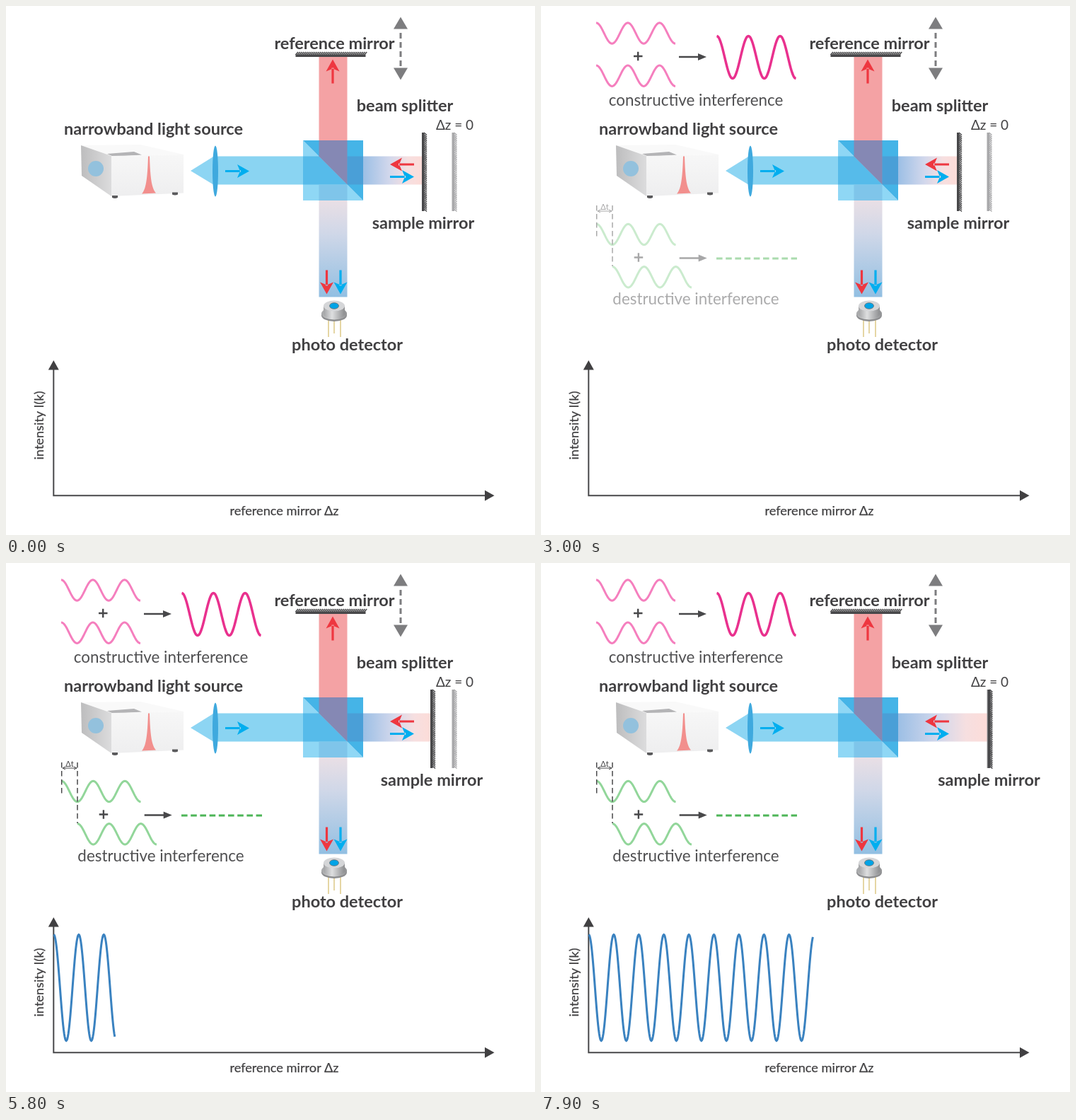
These frames come from a looping animation (748 px wide and 748 px high, 8 s). An HTML page:

```html
<!DOCTYPE html>
<html lang="en">
<head>
<meta charset="utf-8">
<title>Interferometer</title>
<style>
html, body { margin: 0; width: 100%; height: 100%; overflow: hidden; background: #fff; }
svg { display: block; width: 100%; height: 100%; }
text { font-family: Lato, "Open Sans", sans-serif; fill: #414042; }
.label { font-size: 23.5px; font-weight: 700; text-anchor: middle; }
.caption { font-size: 22.4px; fill: #505052; text-anchor: middle; }
.axis { font-size: 18.2px; stroke: #414042; stroke-width: .25; text-anchor: middle; }
.wave { fill: none; stroke-width: 3; }
.ink { stroke: #48484a; fill: none; }
</style>
</head>
<body>
<svg id="stage" viewBox="0 0 748 748">
  <defs>
    <linearGradient id="sampleBeam">
      <stop offset="0" stop-color="#9cbfe5"/>
      <stop offset=".45" stop-color="#d3d8ec"/>
      <stop offset=".75" stop-color="#f6dfe0"/>
      <stop offset="1" stop-color="#fddcd8"/>
    </linearGradient>
    <linearGradient id="detectorBeam" x2="0" y2="1">
      <stop offset="0" stop-color="#e9dfe5"/>
      <stop offset=".35" stop-color="#cfd7e8"/>
      <stop offset="1" stop-color="#92bfe2"/>
    </linearGradient>
    <linearGradient id="side">
      <stop offset="0" stop-color="#bdbdbe"/>
      <stop offset="1" stop-color="#dcdcdd"/>
    </linearGradient>
    <linearGradient id="front" x2="0" y2="1">
      <stop offset="0" stop-color="#f7f7f7"/>
      <stop offset="1" stop-color="#eeeeef"/>
    </linearGradient>
    <linearGradient id="metal">
      <stop offset="0" stop-color="#a2a3a5"/>
      <stop offset=".4" stop-color="#dedfe0"/>
      <stop offset="1" stop-color="#8d8e90"/>
    </linearGradient>
    <path id="arrow" d="M-34-1.6H-12V1.6H-34ZM0 0L-17-9.5L-13 0L-17 9.5Z"/>
    <g id="sumArrow">
      <path class="ink" stroke-width="2.4" d="M131 71h12.5M137.2 64.8v12.5M195 72h30"/>
      <path d="M234 72l-12-5v10z" fill="#48484a"/>
    </g>
  </defs>

  <!-- light source -->
  <path d="M106 197L190 196L251 210L149 212Z" fill="#f9f9f9"/>
  <path d="M143 209L181 206L192 210.5L152 213Z" fill="#b4b4b6"/>
  <path d="M106 197L149 212V269L107 240Z" fill="url(#side)"/>
  <path d="M149 212L251 210V264.500L149 269Z" fill="url(#front)"/>
  <path d="M150 268h8v3q-4 2-8 0zM235 263.500h8v3q-4 2-8 0z" fill="#5a5a5c"/>
  <circle cx="127" cy="230" r="11" fill="#93c1dd"/>
  <path d="M192 265.500C198 259 200 244 201 212.500H203C204 244 206 258 212 264.500Z" fill="#f28f8d"/>

  <!-- beams and splitter -->
  <path d="M261 233L294 212.500V253Z" fill="#8dd5f3"/>
  <path d="M296 212.500H420V252.500H296Z" fill="#8ad4f2"/>
  <ellipse cx="296" cy="233.500" rx="4" ry="36" fill="#3fa9de"/>
  <path d="M442.500 71H482.500V190H442.500Z" fill="#f4a2a4"/>
  <path d="M442.500 275H482.500V411.500H442.500Z" fill="url(#detectorBeam)"/>
  <rect id="sampleArm" x="505" y="212.500" height="40" fill="url(#sampleBeam)"/>
  <path d="M420 190V275H505Z" fill="#8fd7f5"/>
  <path d="M420 190H505V275Z" fill="#45b4e7"/>
  <path d="M420 212.500H442.500L482.500 252.500H420Z" fill="#56bbea"/>
  <path d="M482.500 252.500V275H442.500V252.500Z" fill="#7fc5ea"/>
  <path d="M482.500 212.500H505V252.500H482.500Z" fill="#4a9fd7"/>
  <path d="M442.500 190H482.500V252.500L442.500 212.500Z" fill="#8588b4"/>

  <!-- detector -->
  <path d="M456 444v24M464 444v19M473 444v24" stroke="#e3d29b" stroke-width="1.800"/>
  <ellipse cx="464" cy="437.500" rx="18" ry="8.500" fill="#8d8e90"/>
  <ellipse cx="464" cy="435" rx="18" ry="8.500" fill="url(#metal)"/>
  <path d="M449 424V435A15 7.500 0 0 0 479 435V424Z" fill="url(#metal)"/>
  <ellipse cx="464" cy="424" rx="15" ry="7.500" fill="#d5d6d8"/>
  <ellipse cx="464" cy="424" rx="6.500" ry="4.300" fill="#00a3e6" stroke="#6b6c6e" stroke-width=".8"/>

  <g id="arrows"></g>
  <g fill="#7d7d7f">
    <path d="M558 15.500l10 17h-20zM558 104.500l10-17h-20z"/>
    <path d="M558 38V86" stroke="#7d7d7f" stroke-width="3" stroke-dasharray="8 5"/>
  </g>

  <g id="mirrors"></g>

  <text class="label" x="464.500" y="60.500">reference mirror</text>
  <text class="label" x="564" y="148.500">beam splitter</text>
  <text class="label" x="208.500" y="182">narrowband light source</text>
  <text class="label" x="482.500" y="487">photo detector</text>
  <text x="634.500" y="175" font-size="19" text-anchor="middle">Δz = 0</text>

  <g id="constructive">
    <use href="#sumArrow"/>
    <path class="wave" data-wave="78 38.500 14.700 44.800 2.500" stroke="#f57fbe"/>
    <path class="wave" data-wave="78 98.700 14.700 44.800 2.500" stroke="#f57fbe"/>
    <path class="wave" data-wave="248.500 72.500 30 44.800 2.500" stroke="#e9318e" style="stroke-width:3.500"/>
    <text class="caption" x="219" y="140.500">constructive interference</text>
  </g>

  <g id="destructive">
    <use href="#sumArrow" x=".7" y="284.500"/>
    <path class="wave" data-wave="78.500 323 14.700 44.800 2.500" stroke="#92d69a"/>
    <path class="wave" data-wave="101 383.300 14.700 44.800 2.500" stroke="#92d69a"/>
    <path d="M248 357H362" stroke="#4db557" stroke-width="3" stroke-dasharray="8.600 4.600"/>
    <path class="ink" stroke-width="1.500" stroke-dasharray="7.500 4.500" d="M78.700 282V328M101 282V368"/>
    <path class="ink" stroke-width="1" d="M80 290H100M84 288l-4 2l4 2M96 288l4 2l-4 2"/>
    <text x="90" y="287.500" font-size="11" text-anchor="middle">Δt</text>
    <text class="caption" x="219" y="421.500">destructive interference</text>
  </g>

  <!-- chart -->
  <path class="ink" stroke-width="2" d="M67.300 512V692.300H679"/>
  <path d="M67.300 501l7.500 13.500h-15zM690.500 692.300l-13.500-7.500v15z" fill="#414042"/>
  <text class="axis" x="393.500" y="720">reference mirror Δz</text>
  <text class="axis" transform="translate(53 593) rotate(-90)">intensity I(k)</text>
  <path id="signal" class="wave" data-wave="67.500 600.500 75 35.400 9" pathLength="2772" stroke="#3a82c0"/>
</svg>
<script>
const LOOP = 8000, TICK = 100;
const $ = id => document.getElementById(id);
const clamp01 = v => Math.min(1, Math.max(0, v));

// data-wave: left, middle, amplitude, period, number of periods
for (const path of document.querySelectorAll('[data-wave]')) {
  const [left, mid, amp, period, count] = path.dataset.wave.split(' ').map(Number);
  const samples = count * 48;
  path.setAttribute('d', 'M' + Array.from({ length: samples + 1 }, (_, i) => {
    const u = i / 48;
    return `${(left + u * period).toFixed(2)} ${(mid - amp * Math.cos(u * 2 * Math.PI)).toFixed(2)}`;
  }).join('L'));
}

const RED = '#ee3740', BLUE = '#00aeef';
$('arrows').innerHTML = [
  [344, 233.5, 0, BLUE], [543, 224, 180, RED], [577, 241.5, 0, BLUE],
  [462, 75.5, -90, RED], [453.5, 407.5, 90, RED], [473, 407.5, 90, BLUE]
].map(([x, y, angle, fill]) =>
  `<use href="#arrow" fill="${fill}" transform="translate(${x} ${y}) rotate(${angle})"/>`).join('');

// A thin plate with slanted hatching along its back
function mirror(length, color) {
  let hatch = '';
  for (let y = 0; y < length - 1; y += 2.7) hatch += `M3 ${y.toFixed(1)}l4 3.5`;
  return `<path d="M0 0H3.6V${length}H0Z" fill="${color}"/>
    <path d="${hatch}" stroke="${color}" stroke-width="1.5"/>`;
}
$('mirrors').innerHTML = `
  <g transform="translate(409.5 72) rotate(-90)">${mirror(99, '#48484a')}</g>
  <g transform="translate(630.5 179)">${mirror(111, '#a9a9ab')}</g>
  <g id="sample">
    <g transform="translate(588 179)">${mirror(111, '#48484a')}</g>
    <text class="label" x="590" y="315">sample mirror</text>
  </g>`;

function draw(time) {
  const t = Math.floor(time % LOOP / TICK) * TICK;
  $('constructive').style.opacity = clamp01((t - 100) / 1900);
  $('destructive').style.opacity = clamp01((t - 2100) / 1900);

  const steps = Math.max(0, (t - 5000) / TICK);
  const shift = 1.5 * steps;
  $('sample').setAttribute('transform', `translate(${shift} 0)`);
  $('sampleArm').setAttribute('width', 84 + shift);
  // The trace is drawn at constant speed along its length
  $('signal').style.visibility = steps ? 'visible' : 'hidden';
  $('signal').setAttribute('stroke-dasharray', `${95.45 * steps} 9999`);
}

const start = performance.now();
function frame() {
  draw(performance.now() - start);
  requestAnimationFrame(frame);
}
frame();
</script>
</body>
</html>
```
